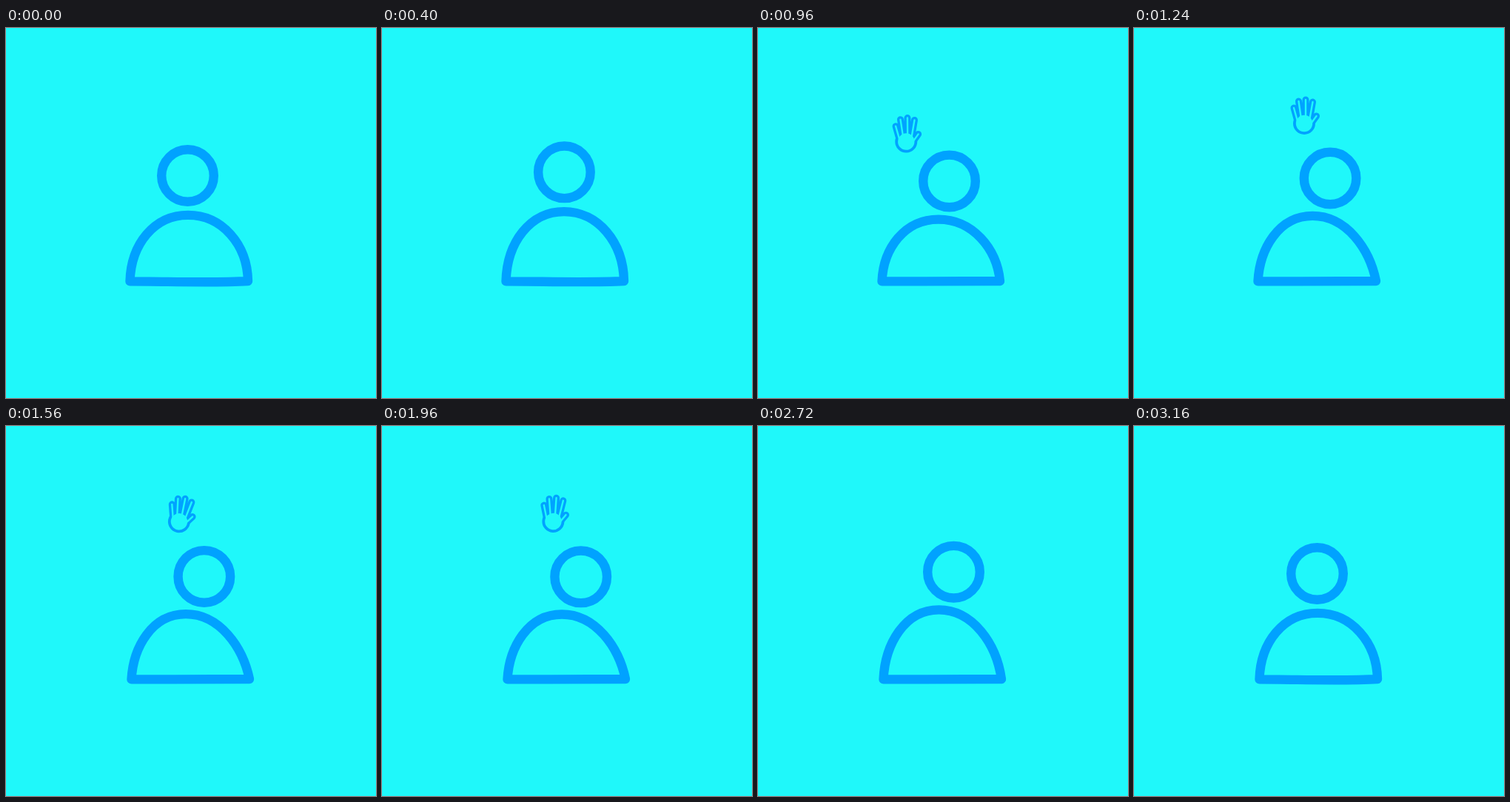
These frames come from a looping animation (500x500 px, 4080 ms). An HTML page:

```html
<!DOCTYPE html>
<html lang="en">
<head>
<meta charset="utf-8">
<title>Waving person</title>
<style>
  :root { --back: #1ff8fa; --line: #00a2ff; }
  html, body { margin: 0; width: 100%; height: 100%; overflow: hidden; background: var(--back); }
  svg { display: block; width: 100%; height: 100%; }
  path, circle { fill: none; stroke: var(--line); stroke-width: 12.4; stroke-linejoin: round; stroke-linecap: round; }
  #hand path { stroke-width: 9; }
  #hand circle { fill: var(--line); stroke: none; }
  #hand .inner path { stroke: var(--back); stroke-width: 2.4; }
  #hand .inner circle { fill: var(--back); }
</style>
</head>
<body>
<svg viewBox="0 0 500 500">
  <g id="person">
    <path id="body"/>
    <circle id="head" r="35.3"/>
  </g>
  <g id="hand"></g>
</svg>
<script>
const LOOP = 4080, STEP = 40, END = 3160;
const FOOT_L = 167.5, FOOT_R = 327, FLOOR = 342.4;
const $ = id => document.getElementById(id);

// Fingers and palm: a thick layer with a thin one on top leaves an outline
const fingers = 'M-10 8L-15-10M-5 5L-8.5-19M1 5L1-21M6 7L10.5-18M6 14L15.5 1';
const layer = (name, r) => `<g class="${name}"><path d="${fingers}"/><circle cx="-1" cy="11" r="${r}"/></g>`;
$('hand').innerHTML = layer('outer', 15) + layer('inner', 11.2);

// Head path: time, x, y
const headKeys = [
  [0, 245.5, 199.5],
  [320, 246, 192.8],
  [720, 250, 212],
  [1160, 265, 203],
  [1960, 266.7, 203.8],
  [2400, 273, 195.7],
  [END, 245.5, 199.5]
];

function ramp(t, from, to) {
  const p = Math.min(1, Math.max(0, (t - from) / (to - from)));
  return p * p * (3 - 2 * p);
}

function headAt(t) {
  const i = Math.max(1, headKeys.findIndex(k => k[0] >= t));
  const [t0, x0, y0] = headKeys[i - 1], [t1, x1, y1] = headKeys[i];
  const e = ramp(t, t0, t1);
  return [x0 + (x1 - x0) * e, y0 + (y1 - y0) * e];
}

// The torso follows the head: its top moves along and the right side slants
function torso(headX, headY) {
  const offset = headX - headKeys[0][1];
  const lean = Math.min(1, (offset / 20) ** 2);
  const topX = 246 - 5 * lean, topY = headY + 53.4 - 0.13 * offset;
  const handleY = FLOOR - (FLOOR - topY) * (0.56 - 0.07 * lean);
  const bow = Math.max(0, 2.5 - offset / 2);
  return `M${FOOT_L} ${FLOOR}C${169 + lean} ${handleY} ${topX - 46} ${topY} ${topX} ${topY}` +
    `S${326 - 8 * lean} ${handleY} ${FOOT_R} ${FLOOR - 0.4}` +
    `C280 ${FLOOR + bow} 220 ${FLOOR} ${FOOT_L} ${FLOOR}Z`;
}

// The hand flies in from the left, swings about its wrist, then shrinks away
function handTransform(t) {
  const come = ramp(t, 700, 1080), go = ramp(t, 2200, 2600), away = go ** 2.5;
  const wave = 5.7 * (1 - Math.cos((t - 1240) / 600 * 2 * Math.PI));
  const angle = wave - 50 * (1 - come) + 60 * go;
  const x = 231 - 71 * (1 - come * come);
  const y = 149 + 104 * (1 - come) - 37 * away;
  const scale = Math.min(1, 2 * come) * (1 - away);
  return `translate(${x} ${y}) rotate(${angle}) translate(0 -31) scale(${scale})`;
}

const start = performance.now();

function draw(now) {
  const time = Math.max(0, now - start) % LOOP;
  const t = Math.min(END, Math.floor(time / STEP) * STEP);
  const [x, y] = headAt(t);
  $('head').setAttribute('cx', x);
  $('head').setAttribute('cy', y);
  $('body').setAttribute('d', torso(x, y));
  $('person').setAttribute('transform', `translate(${2 * ramp(t, 1240, 1560)})`);
  $('hand').setAttribute('transform', handTransform(t));
  requestAnimationFrame(draw);
}
draw(start);
</script>
</body>
</html>
```
